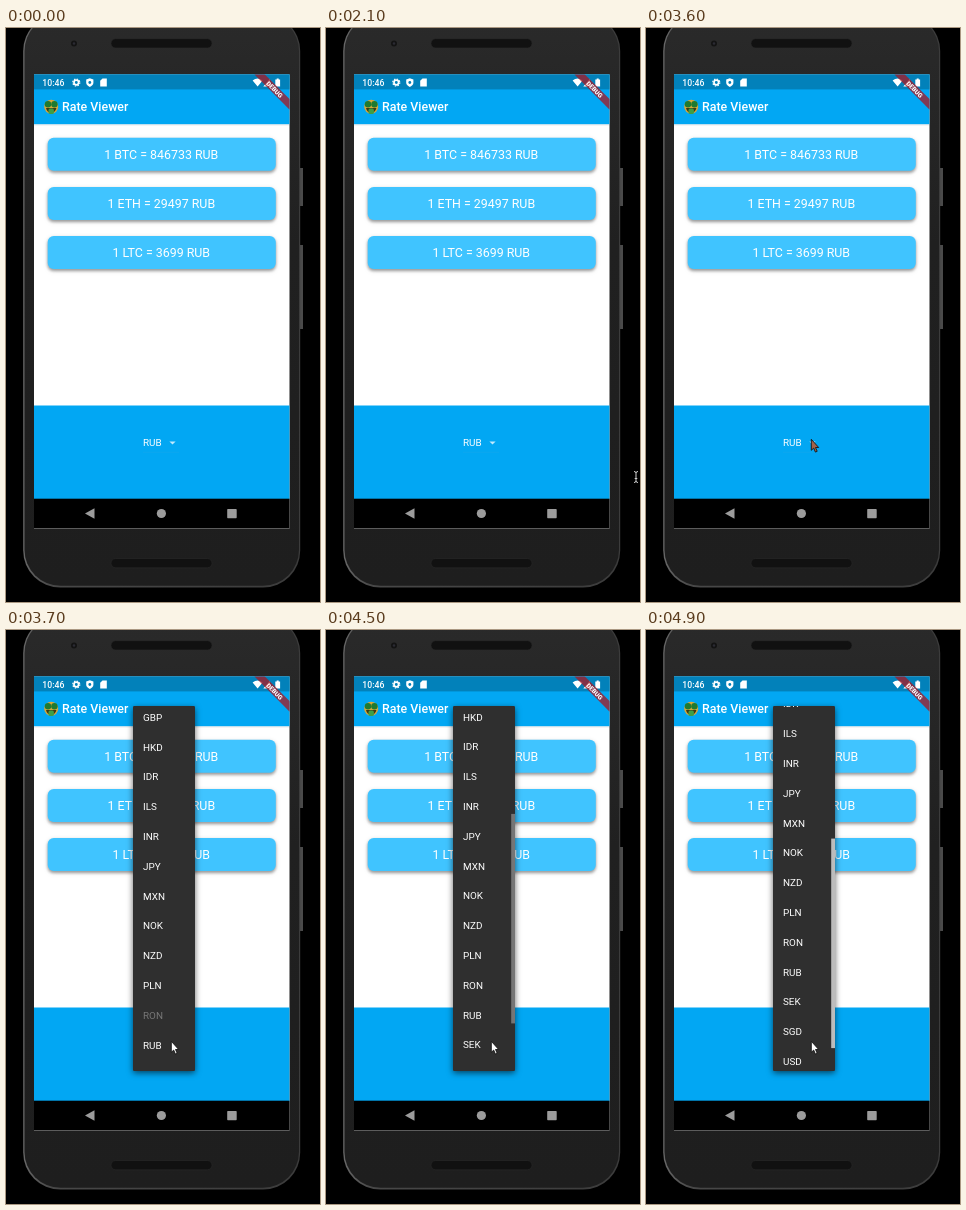
An HTML page for the animation above (5000 ms loop, 314 by 574 pixels).

```html
<!DOCTYPE html>
<html lang="en">
<head>
<meta charset="utf-8">
<title>Rate Viewer</title>
<style>
  html, body { margin: 0; width: 100%; height: 100%; overflow: hidden; background: #000; }
  svg { display: block; width: 314px; height: 574px; font-family: Roboto, sans-serif; fill: #fff; }
  .card { fill: #40c4ff; filter: drop-shadow(0 2px 1.6px #0005) drop-shadow(0 1px 2px #0002); }
  .label { font-size: 12.4px; text-anchor: middle; }
  .item { font-size: 9.9px; }
  .bar { fill: #02a7f3; }
  #panel { fill: #2f2f2f; filter: drop-shadow(0 2px 3px #0009); }
</style>
</head>
<body>
<svg viewBox="0 0 314 574">
  <defs>
    <clipPath id="screenClip"><rect x="28" y="46.5" width="255.5" height="454"/></clipPath>
    <clipPath id="menuClip"><rect x="127" y="76" width="62" height="365"/></clipPath>
    <linearGradient id="rim">
      <stop offset="0" stop-color="#686868"/>
      <stop offset=".1" stop-color="#484848"/>
      <stop offset="1" stop-color="#3c3c3c"/>
    </linearGradient>
    <linearGradient id="body" x2="0" y2="1">
      <stop offset="0" stop-color="#2a2a2a"/>
      <stop offset=".4" stop-color="#202020"/>
      <stop offset="1" stop-color="#1e1e1e"/>
    </linearGradient>
  </defs>

  <!-- Phone -->
  <rect width="314" height="574" fill="#000"/>
  <path d="M294 140h3v38h-3zM294 217h3v84h-3z" fill="#4a4a4a"/>
  <rect x="17.2" y="-14" width="277" height="573.6" rx="37" fill="url(#rim)"/>
  <rect x="18.5" y="-13" width="274.5" height="570.8" rx="36" fill="url(#body)"/>
  <circle cx="68" cy="15.5" r="3" fill="#141414"/>
  <circle cx="68" cy="15.5" r="1.2" fill="#2b2b33"/>
  <g fill="#111" stroke="#2a2a2a" stroke-width=".6">
    <rect x="105" y="10.700" width="101" height="9.300" rx="4.600"/>
    <rect x="105" y="530.500" width="101" height="9.300" rx="4.600"/>
  </g>

  <g clip-path="url(#screenClip)">
    <rect x="28" y="46" width="256" height="455" fill="#fff"/>
    <rect x="28" y="96" width="256" height="1.700" fill="#0001"/>
    <rect class="bar" x="28" y="46" width="256" height="50.200"/>
    <rect x="28" y="46" width="256" height="15.400" fill="#0281ba"/>
    <rect class="bar" x="28" y="377.500" width="256" height="94"/>
    <rect x="28" y="470.700" width="256" height="30" fill="#000"/>

    <!-- Status bar -->
    <g transform="translate(.3 .5)">
      <text x="36" y="57.200" font-size="8.700" font-weight="500">10:46</text>
      <circle cx="70" cy="54" r="2.300" fill="none" stroke="#fff" stroke-width="1.700"/>
      <circle cx="70" cy="54" r="3.500" fill="none" stroke="#fff" stroke-width="1.200" stroke-dasharray="1.400 1.350"/>
      <path d="M83.500 49.700l3.600 1.400v3q0 3-3.600 4.400-3.600-1.400-3.600-4.400v-3z"/>
      <circle cx="83.500" cy="54" r="1.400" fill="#0281ba"/>
      <path d="M96.200 50h4.300v8h-6.600v-5.700z"/>
      <path d="M246.300 52q5-4 10 0l-5 6zM257 58l6.500-7.500V58zM269 51h1.400v-1h2v1h1.400v7H269z"/>
    </g>

    <!-- App bar -->
    <g>
      <circle cx="45.200" cy="78.700" r="7" fill="#d9a83a"/>
      <circle cx="42" cy="76.300" r="3.200" fill="#1f7a30"/>
      <circle cx="48.400" cy="76.300" r="3.200" fill="#1f7a30"/>
      <path d="M40 80h10.400q-1 4.500-5.200 4.500T40 80z" fill="#3d3a14"/>
      <rect x="42.500" y="80.500" width="5.400" height="5.500" rx="1.500" fill="#3f9e45"/>
    </g>
    <text x="56" y="83" font-size="12.400" font-weight="500">Rate Viewer</text>

    <g transform="translate(283.500 46.500) rotate(45)">
      <rect x="-25" y="17.400" width="50" height="7.400" fill="#a51c28" fill-opacity=".78"/>
      <text y="23.400" font-size="6.300" font-weight="900" text-anchor="middle">DEBUG</text>
    </g>

    <g id="cards"></g>

    <!-- Currency button -->
    <text class="item" x="137" y="418.400">RUB</text>
    <path d="M163.400 413.500h6.200l-3.100 3.100z" fill-opacity=".75"/>
    <path d="M137 424.300h36" stroke="#bdbdbd" stroke-width=".5" stroke-opacity=".12"/>

    <!-- Navigation -->
    <g fill="#9c9c9c">
      <path d="M79 485.500l9.500-5.200v10.400z"/>
      <circle cx="155.400" cy="485.500" r="4.600"/>
      <rect x="221.200" y="481" width="9.500" height="9.300" rx=".7"/>
    </g>

    <g id="menu">
      <rect id="panel" x="127" y="76" width="62" height="365" rx="1.300"/>
      <g clip-path="url(#menuClip)">
        <g id="items"></g>
        <rect id="thumb" x="185.200" width="3.800" height="209.500" fill="#bcbcbc"/>
      </g>
    </g>
  </g>

  <g id="cursor">
    <path id="arrow" d="M.3.300v11l2.400-2.200 1.700 4 1.800-.8-1.700-3.800h3.200z" stroke="#161616" stroke-width=".9"/>
    <path id="beam" d="M-2-5.500q2 0 2 1.500v8q0 1.500-2 1.500M2-5.500q-2 0-2 1.500M2 5.500q-2 0-2-1.500M-1.300 1.500h2.600" fill="none" stroke="#d0d0d0"/>
  </g>
</svg>

<script>
const LOOP = 5000, STEP = 100;
const MENU_TOP = 76, ROW = 29.8, PADDING = 5, THUMB_RATIO = 0.574;
const OPEN_AT = 3700;
const CURRENCIES = ('AUD BRL CAD CNY EUR GBP HKD IDR ILS INR JPY MXN NOK NZD ' +
  'PLN RON RUB SEK SGD USD ZAR').split(' ');
const SELECTED = CURRENCIES.indexOf('RUB');

// Keyframes: [time, ...values]
const POINTER = [[2100, 310, 449], [2300, 276, 440], [2600, 211, 419],
  [2800, 180.5, 412.5], [3000, 165, 411]];
const SCROLL = [[4000, 158], [4200, 164], [4500, 188], [4800, 222], [4900, 231]];

const $ = id => document.getElementById(id);
const clamp = x => Math.max(0, Math.min(1, x));
const show = (node, visible) => node.setAttribute('display', visible ? 'inline' : 'none');

function add(parent, tag, attributes, text = '') {
  const node = document.createElementNS(parent.namespaceURI, tag);
  for (const name in attributes) node.setAttribute(name, attributes[name]);
  node.textContent = text;
  return parent.appendChild(node);
}

function valuesAt(keys, time) {
  const next = keys.findIndex(key => key[0] > time);
  if (next === 0) return keys[0].slice(1);
  if (next < 0) return keys[keys.length - 1].slice(1);
  const a = keys[next - 1], b = keys[next];
  const part = (time - a[0]) / (b[0] - a[0]);
  return a.slice(1).map((value, i) => value + (b[i + 1] - value) * part);
}

['1 BTC = 846733 RUB', '1 ETH = 29497 RUB', '1 LTC = 3699 RUB'].forEach((text, i) => {
  const y = 109.8 + i * 49.1;
  add($('cards'), 'rect', { class: 'card', x: 41.7, y, width: 228.1, height: 33, rx: 6 });
  add($('cards'), 'text', { class: 'label', x: 155.3, y: y + 21.2 }, text);
});

const items = CURRENCIES.map((text, i) => add($('items'), 'text',
  { class: 'item', x: 137, y: MENU_TOP + PADDING + (i + 0.5) * ROW + 3.8 }, text));

function draw(time) {
  const open = time >= OPEN_AT;
  show($('menu'), open);
  if (open) {
    const [scroll] = valuesAt(SCROLL, time);
    $('items').setAttribute('transform', `translate(0 ${-scroll})`);
    $('thumb').setAttribute('y', MENU_TOP + scroll * THUMB_RATIO);
    $('thumb').setAttribute('opacity', clamp((time - 4350) / 300));

    // Rows fade in one after another; the selected one is there at once.
    const progress = 0.867 + (time - OPEN_AT) / 300;
    const unit = 0.5 / (CURRENCIES.length + 1.5);
    items.forEach((item, i) => {
      const fade = (progress - 0.5 - (i + 1) * unit) / (1.5 * unit);
      item.setAttribute('opacity', i === SELECTED ? 1 : clamp(fade));
    });
  }

  const [x, y] = valuesAt(POINTER, time);
  show($('cursor'), time >= POINTER[0][0]);
  $('cursor').setAttribute('transform', `translate(${x} ${y})`);
  show($('beam'), x > 296);
  show($('arrow'), x <= 296);
  $('arrow').setAttribute('fill', open ? '#fff' : '#a4624a');
}

const start = performance.now();
function tick() {
  const elapsed = (performance.now() - start) % LOOP;
  draw(Math.floor(elapsed / STEP) * STEP);
  requestAnimationFrame(tick);
}
tick();
</script>
</body>
</html>
```
